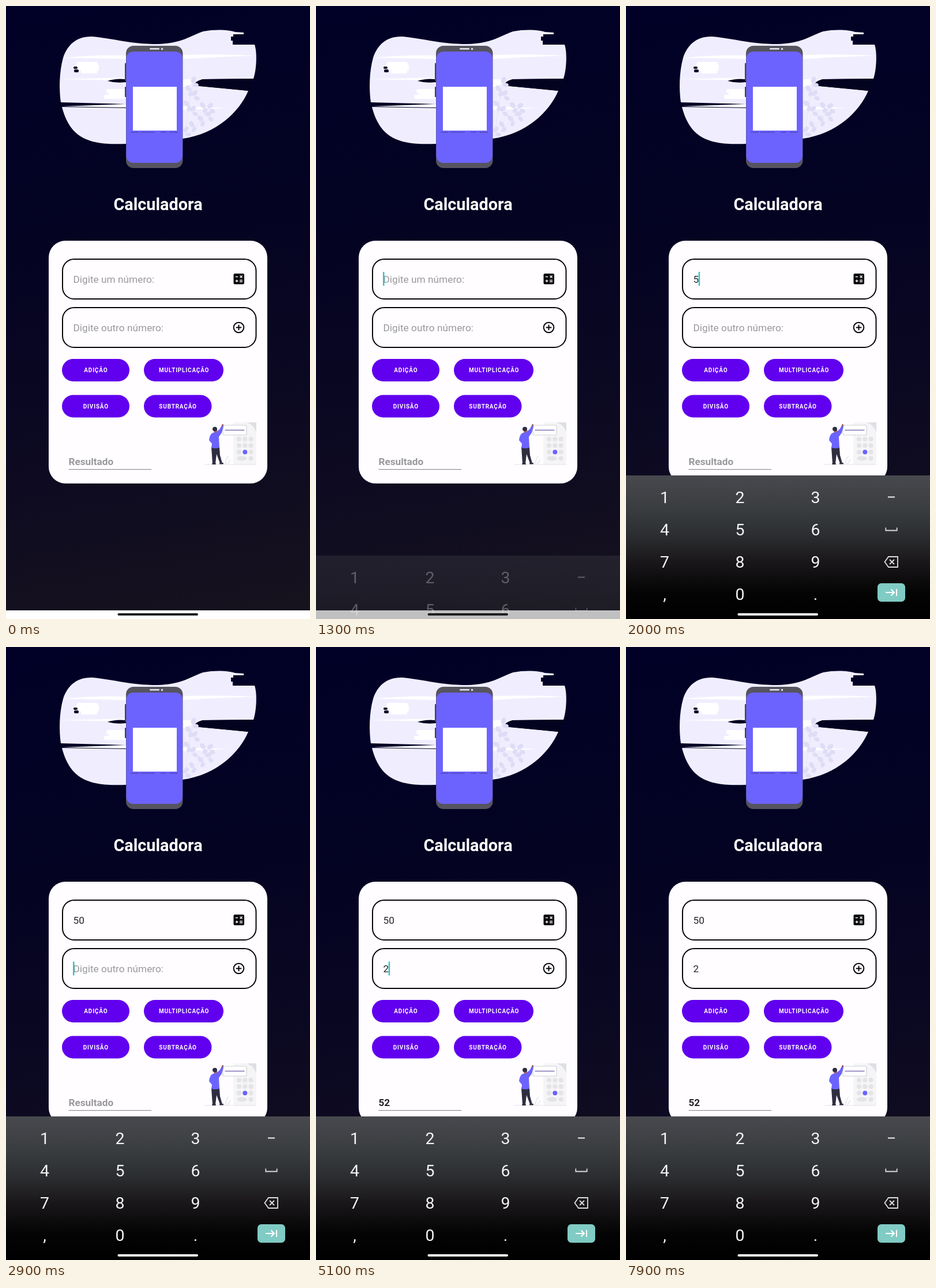
Animation, 527 px wide and 1063 px high, one loop 8 s. Source, as an HTML page with a canvas:

```html
<!DOCTYPE html>
<html lang="pt">
<head>
<meta charset="utf-8">
<title>Calculadora</title>
<style>
html, body { margin: 0; width: 100%; height: 100%; overflow: hidden; background: #080622; }
canvas { display: block; width: 100vw; height: 100vh; }
</style>
</head>
<body>
<canvas id="stage"></canvas>
<script>
const W = 527, H = 1063, LOOP = 8000, STEP = 100;
const KEY_TOP = 814;
const canvas = document.getElementById('stage');
const ratio = window.devicePixelRatio || 1;
canvas.width = W * ratio;
canvas.height = H * ratio;
const c = canvas.getContext('2d');

// Times of the interactions, in ms
const FOCUS = 1200, FIVE = 1900, ZERO = 2200, TAB = 2600, TWO = 3000, SUM = 4500;
const KEYS_START = 1228, KEYS_TIME = 285;

function gradient(x0, y0, x1, y1, stops) {
  const g = c.createLinearGradient(x0, y0, x1, y1);
  stops.forEach(([at, color]) => g.addColorStop(at, color));
  return g;
}

function box(x, y, w, h, r, fill) {
  c.beginPath();
  c.roundRect(x, y, w, h, r);
  c.fillStyle = fill;
  c.fill();
}

function disc(x, y, rx, ry, fill, angle = 0) {
  c.beginPath();
  c.ellipse(x, y, rx, ry, angle, 0, 7);
  c.fillStyle = fill;
  c.fill();
}

function shape(d, fill) {
  c.fillStyle = fill;
  c.fill(new Path2D(d));
}

function line(d, stroke, width = 1, cap = 'butt') {
  c.strokeStyle = stroke;
  c.lineWidth = width;
  c.lineCap = cap;
  c.stroke(new Path2D(d));
}

function text(s, x, y, size, fill, { weight = 400, align = 'left', gap = 0 } = {}) {
  c.font = `${weight} ${size}px Roboto, sans-serif`;
  c.letterSpacing = gap + 'px';
  c.textAlign = align;
  c.fillStyle = fill;
  c.fillText(s, x, y);
}

function background() {
  c.fillStyle = gradient(170, 0, 357, H, [
    [0, '#010127'], [0.35, '#040322'], [0.65, '#0b0822'], [1, '#16121e']
  ]);
  c.fillRect(0, 0, W, H);
}

function leaf(x, y, angle) {
  disc(x, y, 6, 4, '#dfdcf6', angle);
  disc(x + 4, y + 9, 5, 3.5, '#dfdcf6', angle + 1.2);
}

function blob() {
  const pale = '#f0eefe', night = '#04031f';
  shape('M99 90 C106 68 122 52 150 53 C190 57 215 66 262 66 C305 65 318 52 342 44 ' +
    'C362 40 386 41 397 45 L412 46 V49 H394 V53 H390 V60 H393 V67 H431 ' +
    'C436 82 434 112 429 126 L340 127 L326 138 L420 147 ' +
    'C405 183 365 222 306 230 L208 239 C150 241 112 234 97 175 L208 177 V170 L95 167 ' +
    'C92 145 92 115 99 90 Z', pale);
  shape('M100 90 Q155 84 208 86 V92 Q150 90 100 90 Z M307 85 Q370 83 434 86 Q370 88 307 92 Z', '#fff');
  shape('M93 127 L208 124 V129 Z M98 174 L208 170 V176 Z', '#fff');
  shape('M176 130 Q190 125 208 127 V132 Q190 134 176 130 Z', night);
  shape('M307 141 Q325 137 330 122 L320 127 H307 Z', '#fff');
  shape('M326 138 Q327 130 342 127 L429 126 L420 147 L390 144 Z', night);
  shape('M307 174 L384 177 L307 180 Z', '#fff');

  box(123, 97, 36, 6, 3, '#fff');
  box(120, 101, 41, 7, 3, '#fff');
  box(125, 107, 36, 5, 2, '#fff');
  box(130, 111, 28, 6, 2, '#fff');
  box(117, 105, 7, 4, 2, night);
  box(118, 110, 8, 5, 2, night);
  box(174, 144, 34, 7, 3, '#fff');
  box(178, 149, 30, 6, 2, '#fff');
  box(170, 154, 38, 7, 3, '#fff');

  line('M310 226 Q316 165 326 128 M318 219 Q338 202 354 172', '#e4e1f8', 1);
  [[325, 128, 2], [316, 143, 0.8], [327, 151, 2.4], [313, 169, 0.7], [324, 178, 2.5],
   [341, 172, 1], [354, 173, 2.5], [337, 195, 0.8], [351, 187, 2.8], [322, 205, 1],
   [312, 214, 2.2]].forEach(p => leaf(...p));
}

function phone() {
  box(206, 99, 4, 31, 1, '#45434f');
  box(206, 140, 4, 18, 1, '#45434f');
  box(208, 69, 98.5, 212, 13, '#56545f');
  box(208.5, 79, 97.5, 193, 12, '#6c63ff');
  box(249, 73, 17, 2.6, 1.3, '#e6e6ec');
  disc(270.5, 74.5, 1.7, 1.7, '#e6e6ec');
  line('M216 219 H230 M233 219 H258 M268 219 H278 M283 219 H298', '#5049b8', 1.4);
  box(220, 140, 76, 76, 0, '#fff');
}

function field(y) {
  c.beginPath();
  c.roundRect(98, y + 1, 335.5, 69, 20);
  c.strokeStyle = '#050508';
  c.lineWidth = 2;
  c.stroke();
}

function input(value, hint, baseline) {
  text(value || hint, 116.5, baseline, 17.3, value ? '#25252a' : '#99999b');
}

function cursor(value, y) {
  c.font = '400 17.3px Roboto, sans-serif';
  c.letterSpacing = '0px';
  box(116 + c.measureText(value).width, y, 2.5, 24, 0, '#38c3c3');
}

function icons() {
  box(394.5, 464, 18.5, 18.5, 2.2, '#050507');
  line('M397.8 469.5 H402.2 M397.8 476.7 H402.4 M400.1 474.4 V479 ' +
    'M405 475.5 H410 M405 478.2 H410 M405.6 467.4 L409.6 471.4 M409.6 467.4 L405.6 471.4', '#fff', 1.4);
  c.beginPath();
  c.arc(403.5, 557.5, 8.8, 0, 7);
  c.strokeStyle = '#050507';
  c.lineWidth = 2;
  c.stroke();
  line('M398.7 557.5 H408.3 M403.5 552.7 V562.3', '#050507', 2);
}

function button(label, x, y, w, textX) {
  box(x, y, w, 39, 19.5, '#6100ee');
  text(label, textX, y + 23.3, 10, '#fff', { weight: 700, gap: 0.8 });
}

function worker() {
  const dark = '#2f2e41', gray = '#e4e4e7';
  box(394, 722, 40, 73, 2, '#f5f5f7');
  shape('M417 722 H434 V739 Q429 726 417 722 Z', '#dfdfe3');
  line('M344 795 H434', '#e1e1e5', 1);
  box(376, 727, 41, 17, 2, '#fff');
  c.strokeStyle = '#d2d2d8';
  c.lineWidth = 1.2;
  c.stroke();
  line('M379.5 735.5 H413.5', '#8070b4', 1.6);
  for (let row = 0; row < 3; row++)
    for (let col = 0; col < 3; col++)
      disc(404 + col * 10.3, 751 + row * 11.2, 4, 4, row === 2 && col === 1 ? '#6c63ff' : gray);
  disc(409, 784.5, 9, 4, gray);
  disc(424.6, 784.5, 4, 4, gray);
  line('M381 794 Q380 786 386 780 M384 794 L389 786', '#ececf0', 2);

  shape('M356 765 H370 L371 779 L375 793 H371 L365 777 L363 794 H358 Z', dark);
  box(357, 793, 7, 2, 1, dark);
  box(370, 792, 7, 2.5, 1, dark);
  shape('M359 740 Q367 738 371 733 L374 727 L377 729 L374 740 L369 747 L370 766 Q362 768 356 766 ' +
    'L357 759 L352 753 Q353 742 359 740 Z', '#6c63ff');
  disc(375.6, 727, 1.7, 2, '#a0616a');
  disc(363, 736, 3, 4, '#a0616a');
  disc(362, 733.5, 4, 3.8, dark);
}

function card(first, second, result) {
  box(74, 407, 379, 421, 29, '#fffdff');
  field(438);
  field(522);
  input(first, 'Digite um número:', 479.8);
  input(second, 'Digite outro número:', 563.8);
  icons();
  button('ADIÇÃO', 97, 612, 117, 135.3);
  button('MULTIPLICAÇÃO', 239, 612, 138, 265);
  button('DIVISÃO', 97, 674.5, 117, 133.8);
  button('SUBTRAÇÃO', 239, 674.5, 117.5, 265.3);
  worker();
  text(result || 'Resultado', 108.5, 796, 17.2, result ? '#202024' : '#99999b', { weight: 700 });
  c.fillStyle = '#8f8f92';
  c.fillRect(108.5, 803, 143.5, 1.2);
}

function keyboard(p) {
  const y = (1 - p) * (H - KEY_TOP);
  c.save();
  c.globalAlpha = Math.min(1, 0.3 + (p - 0.44) * 1.25);
  c.translate(0, y);
  c.fillStyle = gradient(0, KEY_TOP, 0, H, [
    [0, '#48494e'], [0.25, '#393c3f'], [0.42, '#2b2d30'], [0.6, '#1a171a'], [0.82, '#040404'], [1, '#000']
  ]);
  c.fillRect(0, KEY_TOP, W, H - KEY_TOP);
  ['123', '456', '789', ',0.'].forEach((row, r) => [...row].forEach((key, i) =>
    text(key, [67, 197.5, 328.5][i], 861.5 + r * 56.2, 28.5, '#f4f4f5', { align: 'center' })));
  line('M454 851.5 H466', '#f0f0f1', 2);
  line('M450.3 904.5 V909.5 H469.7 V904.5', '#d8d8da', 1.8);
  line('M455 955 H471 V973 H455 L448.5 964 Z M457 960 L465 968 M465 960 L457 968', '#dededf', 1.8);
  box(436, 1001, 48, 32, 6.5, '#80cbc4');
  line('M450 1017 H465 M459.5 1011.5 L465 1017 L459.5 1022.5 M469 1011 V1023', '#fff', 2);
  c.restore();
}

function draw(t) {
  c.setTransform(canvas.width / W, 0, 0, canvas.height / H, 0, 0);
  background();
  blob();
  phone();
  text('Calculadora', 263.5, 353.5, 28.8, '#fff', { weight: 700, align: 'center' });

  const first = t < FIVE ? '' : t < ZERO ? '5' : '50';
  const second = t < TWO ? '' : '2';
  card(first, second, t < SUM ? '' : '52');

  // The blink restarts with every focus change or typed digit
  const last = [FOCUS, FIVE, ZERO, TAB, TWO].filter(at => at <= t).pop();
  if (last !== undefined && (t - last) % 1000 < 500) {
    if (t < TAB) cursor(first, 461);
    else cursor(second, 545.5);
  }

  c.fillStyle = '#fff';
  c.fillRect(0, 1048, W, H - 1048);
  const k = Math.min(1, Math.max(0, (t - KEYS_START) / KEYS_TIME));
  const p = 1 - (1 - k) ** 2;
  if (p > 0) keyboard(p);
  box(193.5, 1053, 139.5, 4, 2, p > 0.8 ? '#fff' : '#1e1e20');
}

function frame(now) {
  draw(Math.floor((now % LOOP) / STEP) * STEP);
  requestAnimationFrame(frame);
}
frame(performance.now());
</script>
</body>
</html>
```
